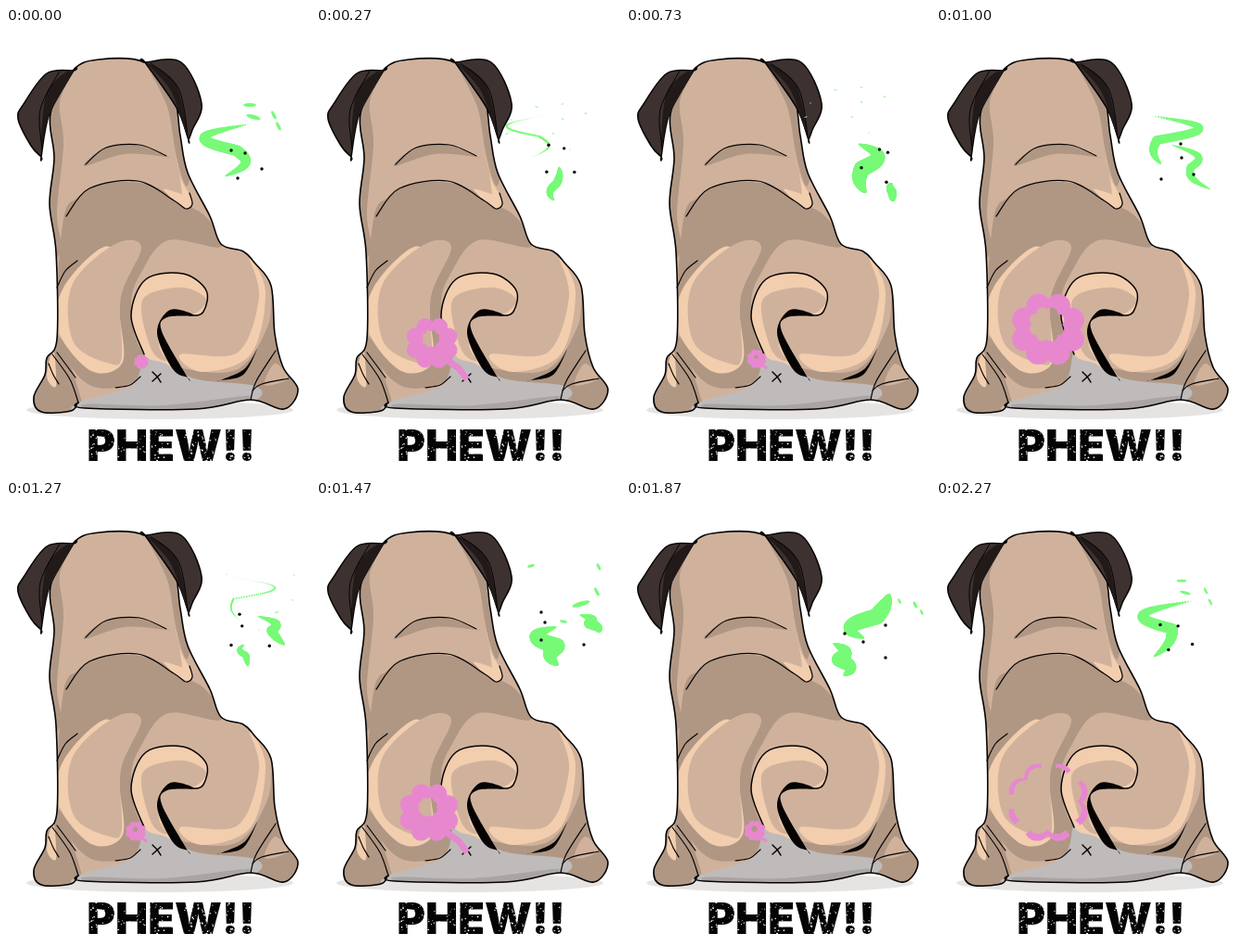
Recreate the animation shown at these times as an HTML page with a canvas. Size 328 px wide and 480 px high, loop 2340 ms.

```html
<!DOCTYPE html>
<html lang="en">
<head>
<meta charset="utf-8">
<title>Phew</title>
<style>
html, body { margin: 0; width: 100%; height: 100%; overflow: hidden; background: #fff; }
canvas { position: absolute; left: 0; top: 0; }
</style>
</head>
<body>
<canvas id="dog" width="328" height="480"></canvas>
<canvas id="fumes" width="328" height="480"></canvas>
<script>
const LOOP = 2340, STEPS = 35, STEP = 66.7;
const TAN = '#d0b29c', SHADE = '#b09784', LIGHT = '#f2ceae', GREY = '#bfbbba',
  EAR = '#3d3230', DARK = '#211a19', INK = '#050303', PINK = '#e788cf', GREEN = '#78fa78';
const context = id => document.getElementById(id).getContext('2d');
const dog = context('dog'), fx = context('fumes');

// Smooth path through the points of a string; a doubled point makes a corner.
function curve(text, closed) {
  const p = text.split(' ').map(s => s.split(',').map(Number)), n = p.length;
  const at = i => closed ? p[(i + n) % n] : p[Math.max(0, Math.min(n - 1, i))];
  const path = new Path2D();
  path.moveTo(...p[0]);
  for (let i = 0; i < (closed ? n : n - 1); i++) {
    const [a, b, c, d] = [at(i - 1), at(i), at(i + 1), at(i + 2)];
    path.bezierCurveTo(b[0] + (c[0] - a[0]) / 6, b[1] + (c[1] - a[1]) / 6,
      c[0] - (d[0] - b[0]) / 6, c[1] - (d[1] - b[1]) / 6, ...c);
  }
  if (closed) path.closePath();
  return path;
}
function fill(color, text) {
  dog.fillStyle = color;
  dog.fill(curve(text, true));
}
function line(text, width = 1.2, closed = false) {
  dog.lineWidth = width;
  dog.strokeStyle = INK;
  dog.stroke(curve(text, closed));
}

function drawDog() {
  dog.lineCap = dog.lineJoin = 'round';
  dog.fillStyle = '#e6e4e3';
  dog.beginPath();
  dog.ellipse(166, 412, 144, 10, 0, 0, 7);
  dog.fill();

  const body = '72,46 100,34 150,37 180,68 188,116 196,156 220,203 232,233 256,241 268,253 ' +
    '286,278 290,330 299,366 315,390 300,411 264,401 205,411 85,410 78,404 70,413 ' +
    '38,414 30,398 42,374 44,356 55,335 54,242 47,190 52,140 48,92';
  fill(TAN, body);
  dog.save();
  dog.clip(curve(body, true));
  // head
  fill(SHADE, '72,44 58,80 62,125 55,200 60,240 40,240 40,60');
  fill(SHADE, '150,36 174,85 184,140 196,170 200,110');
  fill(LIGHT, '180,118 188,160 200,186 178,182 190,181');
  // back
  fill(SHADE, '62,206 85,182 130,172 185,188 216,204 232,236 175,229 147,262 135,300 148,372 92,386 58,330');
  // haunches
  fill(SHADE, '290,270 283,320 250,368 190,367 150,350 145,376 190,395 320,400');
  fill(LIGHT, '106,236 62,280 56,326 92,370 126,360 122,300 130,260');
  fill(TAN, '116,234 71,278 73,339 112,362 125,354 124,290 146,236');
  fill(LIGHT, '262,247 280,285 264,352 212,371 188,352 250,350 273,290');
  // legs
  fill(SHADE, '54,330 38,382 26,392 28,416 78,416 78,390');
  fill(LIGHT, '51,346 44,376 54,386');
  fill(SHADE, '290,340 268,385 268,410 318,412 318,380');
  fill(TAN, '290,362 279,385 304,378');
  // underside
  fill(GREY, '78,404 136,385 149,348 160,346 200,377 268,386 268,402 200,416 84,415');
  fill('#aaa5a4', '84,406 170,407 264,397 205,417 110,418');
  dog.restore();

  // wrinkles
  fill(SHADE, '84,149 108,129 144,127 173,139 173,139 128,136');
  line('86,147 108,129 144,126 173,138');
  fill(SHADE, '64,204 92,172 150,168 200,194 186,193 128,176');
  fill(LIGHT, '170,174 199,184 194,195');
  line('65,203 90,173 142,165 181,186 194,195 201,190 198,178');

  line(body, 1.6, true);
  line('77,251 64,262 55,280');
  line('50,352 69,379 78,404');
  line('46,362 51,374 57,384');
  line('55,350 75,377');
  line('118,388 134,385 145,376');
  line('291,348 270,381 264,401');
  line('266,391 276,384 305,378');
  fill(INK, '271,346 256,374 231,380 231,380 257,368');

  // tail
  const edge = '149,352 135,310 151,271 191,265 216,283 213,306 200,310 184,305';
  fill(LIGHT, edge + ' 168,314 170,350 194,376 172,362');
  fill(TAN, '158,349 146,306 154,287 192,280 216,293 201,309 171,308 165,342 174,359');
  line(edge, 1.5);
  fill(INK, '203,310 177,304 163,329 180,368 196,377 196,377 168,327 174,312');
  line('158,371 163,376 167,382', 1.5);
  line('167,373 158,381', 1.5);

  // ears
  const left = '73,46 73,46 44,49 19,82 13,98 27,127 38,139 38,139 47,92';
  const right = '150,37 150,37 189,37 211,81 201,110 197,121 197,121 184,86';
  for (const ear of [left, right]) {
    fill(EAR, ear);
    line(ear, 1.5, true);
  }
  fill(DARK, '72,46 44,70 38,134 46,96');
  line('58,46 37,88 39,130', 1);
  fill(DARK, '152,38 183,60 196,118 178,68');
  line('156,38 186,65 196,116', 1);
}

function drawTitle() {
  dog.fillStyle = INK;
  dog.font = '900 47px Inter, "Open Sans", sans-serif';
  dog.textAlign = 'center';
  dog.fillText('PHEW!!', 178, 467);
  let seed = 7;
  const random = () => (seed = seed * 16807 % 2147483647) / 2147483647;
  dog.fillStyle = '#fff';
  for (let i = 0; i < 210; i++) {
    dog.beginPath();
    dog.ellipse(88 + random() * 180, 433 + random() * 35, .3 + random() * .9, .3 + random() * .7, random() * 3, 0, 7);
    dog.fill();
  }
}

// Linear blend of keys [time, ...values]; null outside their span.
function blend(keys, t) {
  const j = keys.findIndex(k => k[0] >= t);
  if (j < 0 || t < keys[0][0]) return null;
  const a = keys[Math.max(0, j - 1)], b = keys[j];
  const u = a === b ? 0 : (t - a[0]) / (b[0] - a[0]);
  return b.slice(1).map((v, i) => a[i + 1] + (v - a[i + 1]) * u);
}
function disc(x, y, r) {
  fx.beginPath();
  fx.arc(x, y, Math.max(0, r), 0, 7);
  fx.fill();
}

// time, x, y, radius, hole, gap
const PUFF = [
  [0, 146, 360, 8, 0, 0], [2, 138, 355, 12, .35, 0], [4.5, 122, 336, 33, .32, 0],
  [6.25, 121, 325, 41, .48, 0], [7, 121, 325, 44, .82, .16], [8.75, 121, 325, 46, .9, .2]
];
function flower(x, y, r) {
  for (let k = 0; k < 8; k++) {
    const a = k * Math.PI / 4 + .4;
    disc(x + r * .68 * Math.cos(a), y + r * .66 * Math.sin(a), r * .32);
  }
  disc(x, y, r * .7);
}
function drawPuff(t) {
  const [x, y, r, hole, gap] = blend(PUFF, t), young = t < 3;
  fx.fillStyle = fx.strokeStyle = PINK;
  flower(x, y, r);
  if (t > 1 && t < 5.5) {
    fx.lineWidth = young ? 3 : 7;
    fx.beginPath();
    fx.moveTo(x + r * .5, y + r * .6);
    fx.lineTo(young ? 152 : 154, 367);
    if (!young) fx.lineTo(163, 379);
    fx.stroke();
  }
  fx.globalCompositeOperation = 'destination-out';
  if (hole) flower(x - r * .06 * (1 - hole), y - r * .25 * (1 - hole), r * hole);
  if (gap) for (let k = 0; k < 8; k += k % 3 ? 1 : 2) {
    const a = k * Math.PI / 4 + .8;
    disc(x + r * .85 * Math.cos(a), y + r * .85 * Math.sin(a), r * gap);
  }
  fx.globalCompositeOperation = 'source-over';
}

// time, width, top x, y, bottom x, y, sideways bulge of the upper and lower half
const RISING = [
  [4, 4, 262, 150, 257, 186, 2, -6], [7, 7.5, 270, 141, 257, 188, 2, -10],
  [11, 8, 245, 120, 259, 174, 25, -3], [15, 4.5, 234, 95, 243, 147, 48, -6],
  [20, 0, 240, 78, 255, 125, 48, -6]
];
const TRAILING = [
  [9, 2, 286, 174, 288, 186, 0, 0], [11, 6.5, 287, 161, 288, 187, -4, 0],
  [15, 3.8, 254, 126, 296, 174, 18, -9], [22, 5, 285, 123, 304, 141, 8, 5]
];
const CURLING = [
  [19, 3, 257, 155, 261, 178, -6, 0], [22, 8, 259, 136, 261, 177, -22, -8],
  [28, 8, 284, 101, 257, 148, 2, -22], [34, 5.5, 275, 108, 235, 168, -42, 6],
  [35, 5.5, 261, 104, 236, 160, -41, 16], [40, 0, 245, 92, 232, 134, -38, 14]
];
const HOOK = [[25, 2, 234, 174, 237, 188, 0, 0], [28, 7, 224, 154, 235, 188, 10, 10], [33, 2, 228, 138, 236, 168, 14, 14]];

function ribbon([width, x0, y0, x1, y1, upper, lower]) {
  for (let s = 0; s <= 1; s += .01) {
    const bulge = Math.abs(Math.sin(2 * Math.PI * s)) * (s < .5 ? upper : lower);
    disc(x0 + (x1 - x0) * s + bulge, y0 + (y1 - y0) * s, width * (.1 + Math.sin(Math.PI * s) ** .75));
  }
}

// time, x, y, half length
const BITS = [
  [0, 263, 83, 7], [0, 267, 96, 8], [0, 289, 94, 5], [0, 294, 106, 5],
  [7, 232, 76, 7], [7, 260, 73, 6], [7, 285, 83, 7], [7, 260, 89, 6],
  [7, 205, 90, 4], [7, 200, 105, 7], [7, 250, 105, 6], [7, 268, 122, 4],
  [22, 232, 70, 4], [22, 305, 71, 4], [22, 303, 98, 5], [22, 286, 111, 10], [22, 267, 130, 4],
  [28, 295, 108, 3], [28, 312, 112, 4], [28, 319, 120, 3]
];
function drawBits(step) {
  BITS.forEach(([born, x, y, length], i) => {
    const dt = (step - born + STEPS * 1.5) % STEPS - STEPS / 2, size = 1 - Math.abs(dt) / 4;
    if (size <= 0) return;
    const tilt = x > 286 ? 1.1 : Math.sin(i * 2) * .3;
    fx.beginPath();
    fx.ellipse(x - dt * 2, y - dt * 3, length * size, (.8 + length * .18) * size, tilt, 0, 7);
    fx.fill();
  });
}

// time, then four flies
const FLIES = [
  [0, 243, 132, 258, 135, 276, 152, 250, 162], [7, 257, 122, 275, 126, 281, 158, 248, 150],
  [11, 279, 134, 285, 137, 281, 169, 256, 151], [15, 264, 125, 265, 140, 278, 158, 243, 163],
  [22, 243, 120, 247, 131, 289, 155, 243, 150], [28, 236, 143, 280, 134, 280, 169, 256, 152]
];
FLIES.push([STEPS, ...FLIES[0].slice(1)]);

function frame() {
  const step = Math.min(STEPS - 1, Math.floor(performance.now() % LOOP / STEP));
  fx.clearRect(0, 0, 328, 480);
  drawPuff(step % (STEPS / 4));
  fx.fillStyle = GREEN;
  for (const keys of [RISING, TRAILING, CURLING, HOOK]) for (const t of [step, step + STEPS]) {
    const wisp = blend(keys, t);
    if (wisp) ribbon(wisp);
  }
  drawBits(step);
  fx.fillStyle = INK;
  const flies = blend(FLIES, step);
  for (let i = 0; i < 8; i += 2) disc(flies[i], flies[i + 1], 1.7);
  requestAnimationFrame(frame);
}

drawDog();
drawTitle();
frame();
</script>
</body>
</html>
```
